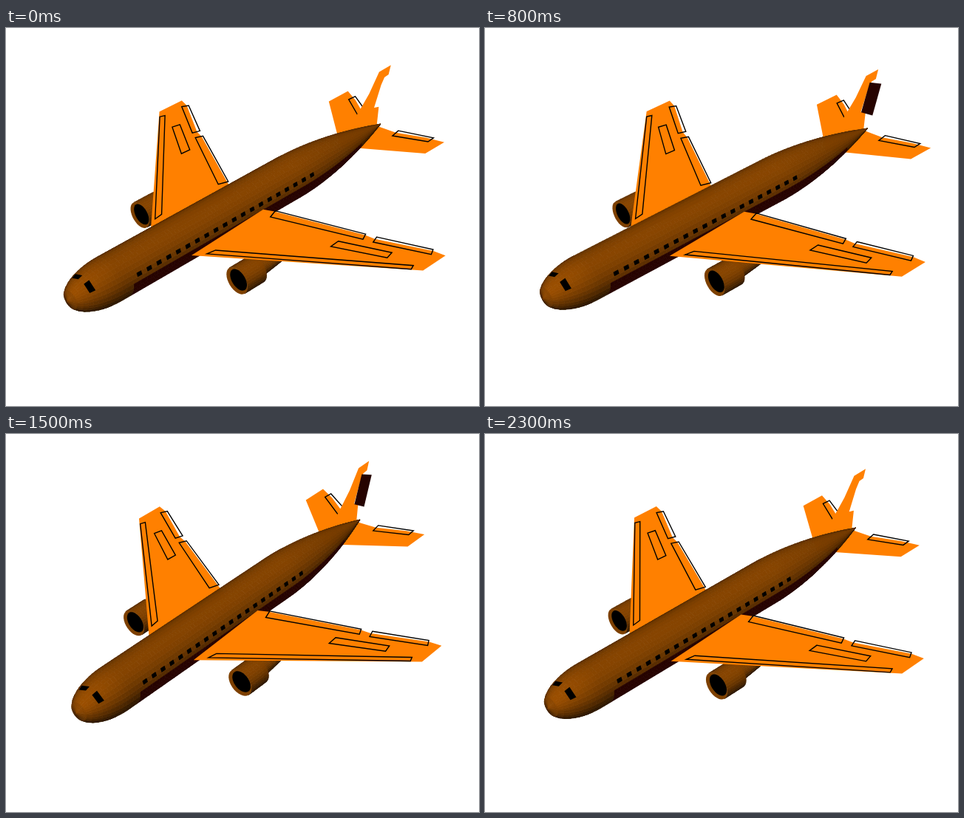
Animation, 640 px wide and 512 px high, one loop 2400 ms. Source, as an HTML page with a canvas:

```html
<!DOCTYPE html>
<html lang="en">
<head>
<meta charset="utf-8">
<title>Turning airliner</title>
<style>
html, body { margin: 0; width: 100%; height: 100%; overflow: hidden; background: #fff; }
canvas { display: block; }
</style>
</head>
<body>
<canvas id="stage" width="640" height="512"></canvas>
<script>
const ctx = document.getElementById('stage').getContext('2d');
const ORANGE = '#ff8000', DARK = '#260300', BLACK = '#000';
const LOOP = 2400, STEP = 100;

// Camera: the plane yaws about a fixed pivot; x runs aft, y to the near wing, z up.
const PIVOT = [223, 290.5], DISTANCE = 1900;
const LOW = 0.62, HIGH = 0.785;          // sine and cosine of the camera's elevation
const LIGHT = [-0.25, 0.25, 0.93];       // right, up, towards the camera
const NOSE = -181, TAIL = 430, RADIUS = 33;

let sin = 0, cos = 1;

function setYaw(degrees) {
  sin = Math.sin(degrees * Math.PI / 180);
  cos = Math.cos(degrees * Math.PI / 180);
}

function project([x, y, z]) {
  const side = x * cos + y * sin, away = x * sin - y * cos;
  const scale = DISTANCE / (DISTANCE + away * HIGH - z * LOW);
  return [PIVOT[0] + side * scale, PIVOT[1] - (away * LOW + z * HIGH) * scale];
}

function trace(points) {
  ctx.beginPath();
  for (const p of points) ctx.lineTo(...project(p));
  ctx.closePath();
}

function fill(points, color) {
  trace(points);
  ctx.fillStyle = color;
  ctx.fill();
}

function outline(points) {
  trace(points);
  ctx.strokeStyle = BLACK;
  ctx.lineWidth = 1.4;
  ctx.stroke();
}

function brown(nx, ny, nz) {
  const right = nx * cos + ny * sin, away = nx * sin - ny * cos;
  const up = away * LOW + nz * HIGH, near = nz * LOW - away * HIGH;
  const dot = (right * LIGHT[0] + up * LIGHT[1] + near * LIGHT[2]) / Math.hypot(nx, ny, nz);
  const level = 0.3 + 0.7 * Math.max(0, dot);
  return `rgb(${Math.round(155 * level)},${Math.round(79 * level)},0)`;
}

// Point on a round body; its shape gives radius and centre for each x.
function onTube(shape, x, a) {
  const r = shape.radius(x);
  return [x, shape.y + r * Math.cos(a), shape.z(r) + r * Math.sin(a)];
}

function patch(shape, x0, x1, a0, a1) {
  return [[x0, a0], [x1, a0], [x1, a1], [x0, a1]].map(([x, a]) => onTube(shape, x, a));
}

function tube(shape, from, to, slices, paint) {
  const sides = 32, dx = (to - from) / slices, da = 2 * Math.PI / sides;
  ctx.lineWidth = 0.8;
  for (let i = slices - 1; i >= 0; i--) {
    const x = from + i * dx;
    const slope = (shape.radius(x + dx) - shape.radius(x)) / dx;
    for (let j = 0; j < sides; j++) {
      const a = 0.1 + j * da, mid = a + da / 2;
      const quad = patch(shape, x, x + dx, a, a + da);
      const [p, q, r, s] = quad.map(project);
      const facing = (r[0] - p[0]) * (s[1] - q[1]) - (r[1] - p[1]) * (s[0] - q[0]);
      if (facing >= 0) continue;
      const color = paint && paint(x, mid) || brown(-slope, Math.cos(mid), Math.sin(mid));
      fill(quad, color);
      ctx.strokeStyle = color;
      ctx.stroke();
    }
  }
}

function disc(x, y, z, r, color) {
  const ring = [];
  for (let a = 0; a < 6.28; a += 0.2) ring.push([x, y + r * Math.cos(a), z + r * Math.sin(a)]);
  fill(ring, color);
}

const hull = {
  y: 0,
  z: r => -0.09 * r,
  radius(x) {
    const nose = Math.max(0, (-110 - x) / 71), tail = Math.max(0, (x - 230) / 200);
    return RADIUS * Math.sqrt(Math.max(0, 1 - nose * nose)) * Math.max(0, 1 - tail ** 1.8);
  }
};

function fuselage() {
  tube(hull, NOSE, TAIL, 100,
    (x, a) => x > -100 && x < 368 && Math.sin(a) < 0.1 && DARK);
  fill(patch(hull, -158, -150, 0.66, 1.24), BLACK);
  fill(patch(hull, -158, -151, 1.7, 2.3), BLACK);
  for (let i = 0; i < 20; i++) {
    const x = -83 + i * 17.3;
    fill(patch(hull, x - 4, x + 4, 0.31, 0.49), BLACK);
  }
}

// Flat panels as [x, y] pairs for one side.
const wingEdge = [[152, 47], [211, 163], [215, 177], [257, 245], [262, 262], [215, 262]];
const wingPanels = [
  [[154, 47], [213, 162], [202, 167], [139, 52]],
  [[220, 176], [259, 243], [249, 248], [208, 180]],
  [[173, 148], [211, 211], [198, 214], [157, 149]],
  [[32, 54], [213, 247], [205, 250], [18, 52]]
];
const tailEdge = [[340, 0], [419, 96], [463, 96], [452, 70], [429, 31], [422, 0]];
const elevator = [[436, 30], [460, 78], [446, 79], [419, 33]];
const finEdge = [
  [345, 14], [382, 54], [395, 69], [413, 99], [439, 100], [436, 85],
  [427, 84], [421, 73], [410, 38], [421, 35], [421, 2]
];
const rudder = [[423, 84], [450, 71], [438, 20], [411, 37]];

function wing(side) {
  const place = ([x, y]) => [x, side * y, 4 - 0.05 * y];
  const root = side > 0 ? [[0, 41], [143, 34]] : [[-15, 25], [138, 20]];
  fill([...root, ...wingEdge].map(place), ORANGE);
  wingPanels.forEach(p => outline(p.map(place)));
}

function stabiliser(side) {
  const place = ([x, y]) => [x, side * y, 0];
  fill(tailEdge.map(place), ORANGE);
  outline(elevator.map(place));
}

function engine(side) {
  const y = side * 98, z = -24;
  const part = radius => ({ y, z: () => z, radius });
  tube(part(x => 13 - (x - 66) * 0.1), 66, 108, 4);
  tube(part(() => 20), 30, 66, 4);
  disc(30, y, z, 20, '#7d4000');
  disc(33, y, z, 16, BLACK);
}

function draw(tick) {
  const swing = Math.abs((tick + 7) % 24 - 12);
  setYaw(37 + 1.07 * swing);
  ctx.fillStyle = '#fff';
  ctx.fillRect(0, 0, 640, 512);

  const upright = ([x, z]) => [x, 0, z];
  engine(-1);
  wing(-1);
  stabiliser(-1);
  fill(finEdge.map(upright), ORANGE);
  if (tick > 5 && tick < 17) fill(rudder.map(upright), DARK);
  stabiliser(1);
  fuselage();
  engine(1);
  wing(1);
}

let shown = -1;
function loop() {
  const tick = Math.floor((performance.now() % LOOP) / STEP);
  if (tick !== shown) draw(shown = tick);
  requestAnimationFrame(loop);
}
loop();
</script>
</body>
</html>
```
